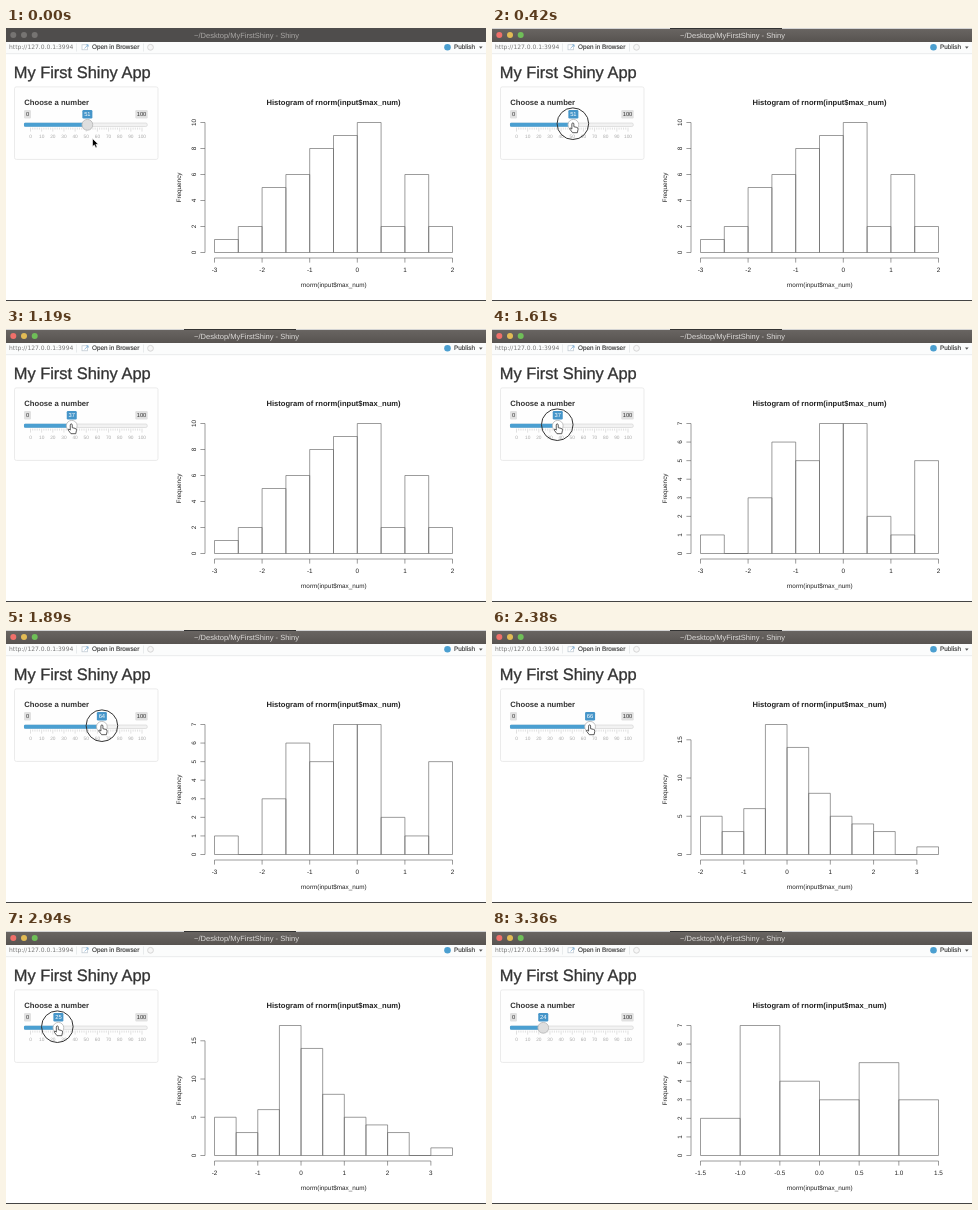
Write an HTML page that moves like this. It is 480 px wide and 273 px high and loops after 4.13 s.

```html
<!DOCTYPE html>
<html lang="en">
<head>
<meta charset="utf-8">
<title>My First Shiny App</title>
<style>
html, body { margin: 0; height: 100%; overflow: hidden; background: #fff; }
svg { display: block; width: 100vw; height: 100vh; }
text { font-family: "Liberation Sans", Arial, sans-serif; fill: #333; text-rendering: geometricPrecision; }
.mid { text-anchor: middle; }
.bold { font-weight: bold; }
#plot path { fill: none; stroke: #666; stroke-width: .65; }
#plot text { font-size: 6.35px; fill: #222; }
#grid path { stroke: #bbb; stroke-width: .45; }
#grid text { font-size: 4.8px; fill: #aaa; }
</style>
</head>
<body>
<svg viewBox="0 0 480 273">
  <defs>
    <linearGradient id="bar" x2="0" y2="1">
      <stop stop-color="#6a6663"/><stop offset="1" stop-color="#575350"/>
    </linearGradient>
  </defs>
  <rect width="480" height="273" fill="#fff"/>

  <!-- window frame -->
  <rect id="head" width="480" height="14" fill="url(#bar)"/>
  <g id="edge"><rect width="480" height="1" fill="#d4d4d4"/><rect x="178" width="112" height="1" fill="#333"/></g>
  <g id="lights"><circle cx="7.3" cy="7" r="3"/><circle cx="18" cy="7" r="3"/><circle cx="28.7" cy="7" r="3"/></g>
  <text id="name" class="mid" x="240.5" y="9.6" font-size="7.5">~/Desktop/MyFirstShiny - Shiny</text>
  <rect y="14" width="480" height="11.5" fill="#fbfcfc"/>
  <path d="M0 25.7H480M70.5 15.5V23.5M137.5 15.5V23.5" stroke="#e4e6e7" stroke-width=".8"/>
  <text x="3" y="21.4" style="font: 6px 'DejaVu Sans', sans-serif; fill: #777">http://127.0.0.1:3994</text>
  <rect x="76" y="16.8" width="5.5" height="5" fill="#fff" stroke="#b9c4cd" stroke-width=".7"/>
  <path d="M78.5 20.3L82 17M80.2 16.8H82.2V18.8" fill="none" stroke="#7fb0d6" stroke-width=".8"/>
  <text x="86" y="21.4" font-size="6.35" stroke="#333" stroke-width=".12">Open in Browser</text>
  <circle cx="144.5" cy="19.3" r="2.9" fill="#f7f7f7" stroke="#d6d6d6" stroke-width="1"/>
  <circle cx="441.5" cy="19.3" r="3.3" fill="#4b9fd0"/>
  <text x="448" y="21.4" font-size="6.4" stroke="#333" stroke-width=".12">Publish</text>
  <path d="M473 18.6h3.6l-1.8 2.2z" fill="#555"/>
  <rect y="272" width="480" height="1" fill="#444"/>

  <!-- side panel -->
  <text x="7.7" y="50" font-size="16.45" stroke="#333" stroke-width=".3">My First Shiny App</text>
  <rect x="8.5" y="58.9" width="143.5" height="72.5" rx="1.8" fill="#fefefe" stroke="#e6e6e6" stroke-width=".8"/>
  <text class="bold" x="18.2" y="76.6" font-size="7.7">Choose a number</text>
  <g font-size="5.8" class="mid">
    <rect x="18" y="82" width="7" height="8.5" rx="1.2" fill="#e1e1e1"/><text x="21.5" y="88.3">0</text>
    <rect x="129.3" y="82" width="12.4" height="8.5" rx="1.2" fill="#e1e1e1"/><text x="135.5" y="88.3">100</text>
  </g>
  <rect x="18.3" y="95" width="123" height="3.5" rx="1.5" fill="#f2f2f2" stroke="#d2d2d2" stroke-width=".6"/>
  <rect id="fill" x="18" y="94.8" height="4" rx="1" fill="#4a9fd1"/>
  <g id="grid" class="mid"></g>
  <g id="knob">
    <rect x="-5" y="82" width="10" height="8.5" rx="1.2" fill="#4595c9"/>
    <text id="value" class="mid" y="88.3" font-size="5.8" style="fill: #fff"></text>
    <circle id="ball" cy="96.8" r="5.4" stroke="#b4b4b4" stroke-width=".8"/>
  </g>

  <g id="plot"></g>

  <!-- pointer -->
  <g id="pointer">
    <circle id="ring" r="15.8" fill="none" stroke="#333" stroke-width="1"/>
    <path id="arrow" d="M0 0V8L1.9 6.4L3.2 9.3L4.6 8.7L3.4 5.8H5.8Z" fill="#000" stroke="#fff" stroke-width=".6"/>
    <path id="hand" d="M-1 .4Q-1 -.8 0 -.8T1 .4V3L4 3.7Q5.4 4.1 5.2 5.6L4.5 9H-.3L-2.9 5.6Q-3.5 4.2 -2.2 4.5L-1 5.4Z" fill="#fff" stroke="#333" stroke-width=".8"/>
  </g>
</svg>
<script>
const LOOP = 4130, STEP = 70;
const $ = id => document.getElementById(id);
const set = (id, attrs) => { for (const k in attrs) $(id).setAttribute(k, attrs[k]); };
const show = (id, on) => set(id, { display: on ? 'inline' : 'none' });
const range = (from, to, by) =>
  Array.from({ length: Math.round((to - from) / by) + 1 }, (_, i) => from + i * by);

const sliderX = v => 24.5 + 1.115 * v;
const drags = [[420, 910], [1610, 2100], [2520, 3010]];
const values = [[0, 51], [560, 51], [630, 49], [840, 37], [1680, 37], [1890, 64],
  [2030, 66], [2590, 66], [2870, 27], [2940, 25], [3010, 24], [LOOP, 24]];

const plots = [
  { start: 0, lo: -3, hi: 2, tick: 1, yTick: 2, counts: [1, 2, 5, 6, 8, 9, 10, 2, 6, 2] },
  { start: 1260, lo: -3, hi: 2, tick: 1, yTick: 1, counts: [1, 0, 3, 6, 5, 7, 7, 2, 1, 5] },
  { start: 2380, lo: -2, hi: 3.5, tick: 1, yTick: 5, counts: [5, 3, 6, 17, 14, 8, 5, 4, 3, 0, 1] },
  { start: 3360, lo: -1.5, hi: 1.5, tick: .5, yTick: 1, counts: [2, 7, 4, 3, 5, 3] }
];

function histogram({ lo, hi, tick, yTick, counts }) {
  const left = 208.5, base = 224.5, top = Math.max(...counts);
  const x = v => left + (v - lo) / (hi - lo) * 238;
  const y = n => base - n / top * 130;
  const w = 238 / counts.length;
  const xs = range(lo, lo + Math.floor((hi - lo) / tick) * tick, tick);
  const ys = range(0, Math.floor(top / yTick) * yTick, yTick);
  const bars = counts.map((n, i) => `M${left + i * w} ${base}V${y(n)}h${w}V${base}z`);
  const xAxis = `M${x(lo)} 230H${x(xs.at(-1))}` + xs.map(v => `M${x(v)} 230v4.6`).join('');
  const yAxis = `M199 ${base}V${y(ys.at(-1))}` + ys.map(n => `M199 ${y(n)}h-4.6`).join('');
  const upright = (px, py, s) =>
    `<text class="mid" transform="translate(${px} ${py}) rotate(-90)">${s}</text>`;
  return `<path d="${bars.join('')}${xAxis}${yAxis}"/>`
    + xs.map(v => `<text class="mid" x="${x(v)}" y="243.5">${v.toFixed(tick < 1 ? 1 : 0)}</text>`).join('')
    + ys.map(n => upright(190, y(n), n)).join('')
    + upright(174.6, 159.5, 'Frequency')
    + '<text class="mid" x="327.7" y="258.8">rnorm(input$max_num)</text>'
    + '<text class="mid bold" x="327.5" y="76.6" style="font-size: 7.6px">Histogram of rnorm(input$max_num)</text>';
}

function track(keys, t) {
  const i = keys.findIndex(k => k[0] > t);
  const [t0, a] = keys[i - 1], [t1, b] = keys[i];
  return a + (b - a) * (t - t0) / (t1 - t0);
}

$('grid').innerHTML = range(0, 100, 2).map(v =>
  `<path d="M${sliderX(v)} 99.6v${v % 10 ? 2 : 4}"/>`
  + (v % 10 ? '' : `<text x="${sliderX(v)}" y="109.6">${v}</text>`)).join('');

let current;
function draw(now) {
  const t = Math.floor(now % LOOP / STEP) * STEP;

  const plot = plots.findLast(p => t >= p.start);
  if (plot !== current) $('plot').innerHTML = histogram(current = plot);

  const active = t >= 420;
  set('head', { fill: active ? 'url(#bar)' : '#4f4d4c' });
  show('edge', active);
  $('name').style.fill = active ? '#dcdad8' : '#a8a6a4';
  const colors = active ? ['#f0706a', '#e2bb55', '#6fbf58'] : ['#767472', '#767472', '#767472'];
  [...$('lights').children].forEach((c, i) => c.setAttribute('fill', colors[i]));

  const v = Math.round(track(values, t)), x = sliderX(v);
  const hover = t >= 210 && t < 3290;
  set('fill', { width: x - 18 });
  set('knob', { transform: `translate(${x} 0)` });
  set('ball', { fill: hover ? '#fff' : '#dedede' });
  $('value').textContent = v;

  // The arrow glides up to the knob; while dragging, the hand runs slightly ahead of it.
  const p = Math.min(1, t / 280);
  const grip = sliderX(track(values, t + 35)) - .5;
  set('pointer', { transform: `translate(${86.5 + (grip - 86.5) * p} ${110.5 - 14.8 * p})` });
  show('pointer', t < 3290);
  show('arrow', !hover);
  show('hand', hover);
  show('ring', drags.some(([a, b]) => t >= a && t < b));
}

const began = performance.now();
function loop() {
  draw((performance.now() - began) % LOOP);
  requestAnimationFrame(loop);
}
loop();
</script>
</body>
</html>
```
